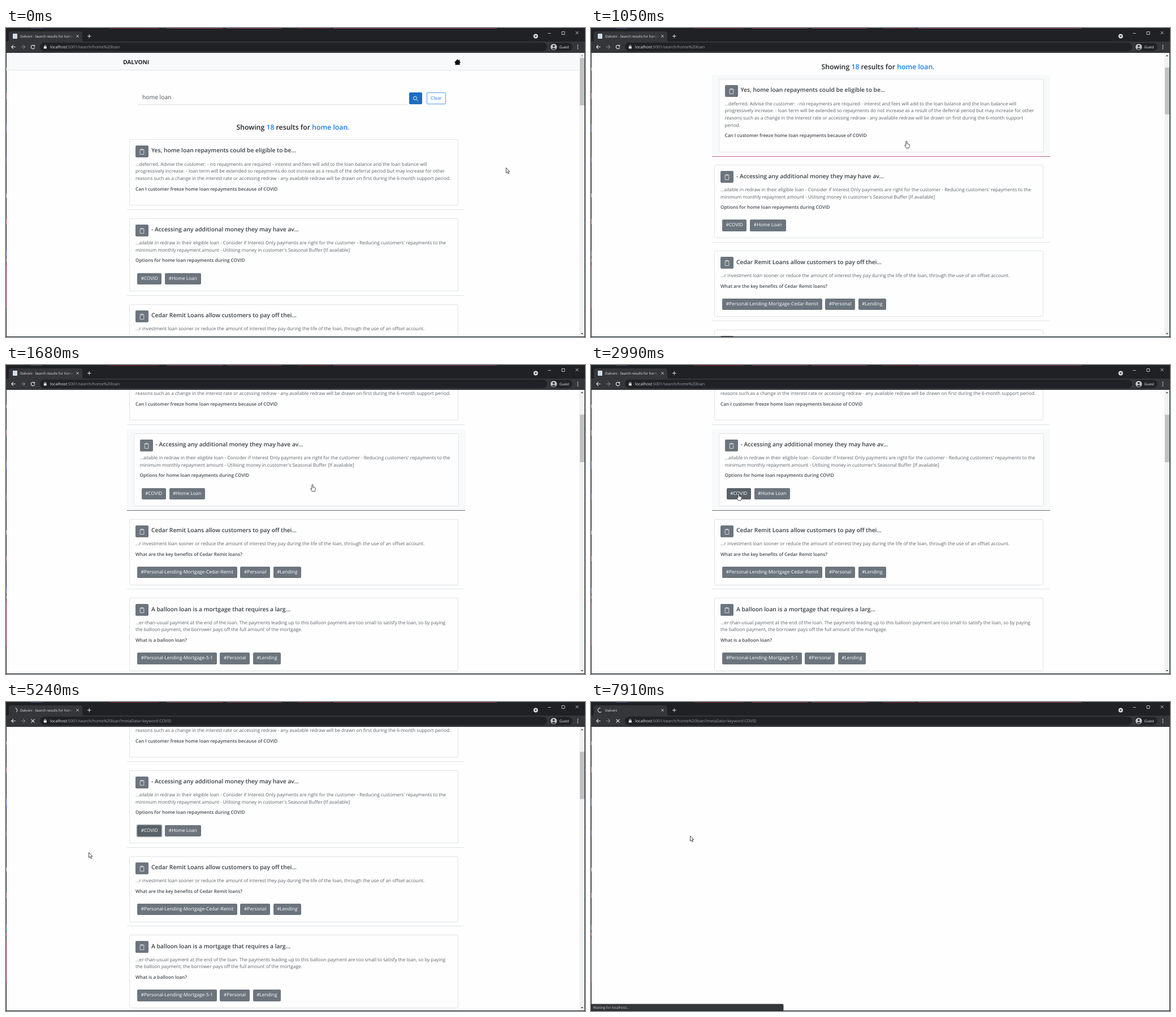
An HTML page for the animation above (7.99 s loop, 1024 by 547 pixels).

```html
<!DOCTYPE html>
<html lang="en">
<head>
<meta charset="utf-8">
<title>Search results</title>
<style>
* { box-sizing: border-box; }
html, body { margin: 0; width: 100%; height: 100%; overflow: hidden; background: #202124; }
body { font-family: "Open Sans", "Noto Sans", sans-serif; text-rendering: geometricPrecision; }
#stage { position: absolute; left: 0; top: 0; width: 1024px; height: 547px; overflow: hidden; }
#stage svg { position: absolute; display: block; }
#frame, #cursor, #status { left: 0; top: 0; }
#page { position: absolute; left: 1px; top: 44px; width: 1022px; height: 502px; background: #fefefe; overflow: hidden; }
#doc { position: absolute; left: -1px; top: -44px; width: 1024px; height: 900px; white-space: nowrap; }
#doc > * { position: absolute; }
.nav { left: 1px; top: 44px; width: 1014px; height: 31px; background: #f8f9fa; border-bottom: 1px solid #e0e3e7; }
.brand { left: 207px; top: 52px; font: 700 10.2px/16px "Open Sans", sans-serif; color: #212529; }
.query { left: 241px; top: 115px; font-size: 10.3px; line-height: 16px; color: #495057; }
.rule { left: 233px; top: 135px; width: 477px; height: 1px; background: #d8dce0; }
.go { left: 713px; top: 114px; width: 23px; height: 21px; border-radius: 2px; background: #1b6ec2; }
.clear { left: 744px; top: 114px; width: 34px; height: 21px; border: 1px solid #4a9df5; border-radius: 2px;
  font-size: 8.3px; line-height: 19px; text-align: center; color: #1a82f7; }
.count { left: 214px; width: 587px; top: 167px; text-align: center; font-weight: 600; font-size: 12.25px; line-height: 18px; color: #212529; }
.count i { font-style: normal; color: #127ff5; }
ul { left: 214px; top: 190.2px; width: 598px; margin: 0; padding: 0; list-style: none; font-size: 8.25px; line-height: 12.8px; color: #5c6268; }
li { width: 597px; padding: 6.8px 0 6.6px; margin-bottom: 8px; border-bottom: 1px solid #dfe2e5; }
li.on { width: 598px; background: #f8f9fa; }
.card { position: relative; margin-left: 4px; width: 582px; padding: 37.6px 0 20.7px 10px;
  border: 1px solid #e1e3e5; border-radius: 2.2px; background: #fefefe; }
.on .card { margin-left: 11.5px; width: 575px; }
.card h5 { position: absolute; left: 38px; top: 12.5px; margin: 0; font-size: 10.27px; line-height: 15px; font-weight: 600; color: #393f44; }
.clip { position: absolute; left: 10px; top: 10px; width: 23px; height: 21px; border-radius: 2px; background: #6c757d; }
.card b { display: block; margin-top: 5.7px; font-weight: 600; font-size: 8.2px; color: #454b51; }
br.wrap { display: none; }
.on br.wrap { display: inline; }
.tags { display: flex; gap: 5.6px; margin: 14.3px 0 -9.4px 3px; }
.tags span { height: 20.5px; padding: 0 6.7px; border-radius: 2px; background: #6c757d; color: #fff; font-size: 8.3px; line-height: 20.5px; }
.tags .dark { background: #596168; }
.tags .ring { box-shadow: 0 0 0 1.6px #b4b9bd; }
#bar { position: absolute; left: 1013px; top: 0; width: 9px; height: 502px; background: #f1f1f1; }
#thumb { position: absolute; left: 1px; width: 8px; background: #c1c1c1; }
#bar svg { left: 0; top: 0; }
</style>
</head>
<body>
<div id="stage">
  <div id="page">
    <div id="doc">
      <div class="nav"></div>
      <div class="brand">DALVONI</div>
      <svg style="left:793px;top:55px" width="11" height="11"><path d="M5.5 .3 8 2.8V1.2h1.4v3L11 5.8l-.7.6-.7-.6V10.3H1.5V5.8l-.8.6L0 5.8Z" fill="#0c0d0e"/></svg>
      <div class="query">home loan</div>
      <div class="rule"></div>
      <div class="go"><svg width="23" height="21" fill="none" stroke="#fff" stroke-width=".9"><circle cx="10.5" cy="10.2" r="3"/><path d="m12.8 12.4 3 3"/></svg></div>
      <div class="clear">Clear</div>
      <div class="count">Showing <i>18</i> results for <i>home loan.</i></div>
      <ul id="list"></ul>
    </div>
    <div id="bar">
      <div id="thumb"></div>
      <svg width="9" height="502"><path id="up" d="M2.5 6 4.8 3.4 7.1 6Z"/><path d="M2.5 496 4.8 498.6 7.1 496Z" fill="#505050"/></svg>
    </div>
  </div>

  <svg id="frame" width="1024" height="547">
    <defs>
      <linearGradient id="fade" gradientUnits="userSpaceOnUse" x1="108" x2="119"><stop stop-color="#35363a" stop-opacity="0"/><stop offset="1" stop-color="#35363a"/></linearGradient>
      <clipPath id="tabClip"><path d="M20 6h99v18H20Z"/></clipPath>
    </defs>
    <path d="M0 0H1024V24H0Z" fill="#202124"/>
    <path d="M0 24H1024V44H0Z" fill="#35363a"/>
    <path d="M0 43.5H1024" stroke="#2b2c2f"/>
    <g id="edges"></g>
    <path d="M2 24q3 0 3-3V10q0-4 4-4H131q4 0 4 4V21q0 3 3 3Z" fill="#35363a"/>
    <rect id="icon" x="12" y="10" width="8" height="9" rx="1" fill="#cddfe8"/>
    <g id="spin" fill="none" stroke-width="1.1"><path id="arc" stroke="#d5d8dc"/></g>
    <g clip-path="url(#tabClip)"><text id="tab" x="25" y="17" font-size="6.1" fill="#e8eaed"></text></g>
    <path d="M108 8h11v14h-11Z" fill="url(#fade)"/>
    <g stroke="#e2e4e7" stroke-width="1" fill="none">
      <path d="m124.5 12.5 4 4m0-4-4 4M144 14.5h6.5M147.2 11.2v6.6"/>
      <path d="M958.5 9.5h5M983 6.5h5v5h-5ZM1007.5 6l5 5m0-5-5 5" stroke-width=".8"/>
      <path d="M16.8 33.5H9.8M13 30.2 9.7 33.5 13 36.8" stroke-width="1.1"/>
      <path d="M26.5 33.5h7M30.3 30.2l3.3 3.3-3.3 3.3" stroke="#7d8084" stroke-width="1.1"/>
      <g id="reload"><path d="M50 31.3A3.3 3.3 0 1 0 50.8 34.4" stroke-width="1.2"/><path d="M51.2 29.6v3.2H48Z" fill="#e2e4e7" stroke="none"/></g>
      <path id="stop" d="m44.6 30.6 5.8 5.8m0-5.8-5.8 5.8" stroke-width="1.2"/>
    </g>
    <circle cx="936.8" cy="14.6" r="4" fill="#d6d8db"/><path d="M934.8 13.6h4l-2 2.6Z" fill="#202124"/>
    <rect x="60" y="26" width="897" height="15" rx="7.5" fill="#202124"/>
    <rect x="66.8" y="32.6" width="5" height="4" rx=".5" fill="#e2e4e7"/><path d="M67.9 33v-1.3a1.4 1.4 0 0 1 2.8 0V33" fill="none" stroke="#e2e4e7" stroke-width=".8"/>
    <text x="78" y="36.2" font-size="7.15" fill="#e8eaed">localhost<tspan id="url" fill="#9aa0a6"></tspan></text>
    <rect x="961.5" y="26.5" width="40" height="14" rx="7" fill="#202124"/>
    <circle cx="968.7" cy="33.6" r="5.7" fill="#bfc3c8"/><circle cx="968.7" cy="32" r="1.9" fill="#35363a"/><path d="M965 37q3.7-3.6 7.4 0-3.7 3-7.4 0Z" fill="#35363a"/>
    <text x="978.6" y="36" font-size="6.4" fill="#f1f3f4">Guest</text>
    <g fill="#e2e4e7"><circle cx="1011.3" cy="30.6" r=".9"/><circle cx="1011.3" cy="33.6" r=".9"/><circle cx="1011.3" cy="36.6" r=".9"/></g>
  </svg>

  <svg id="status" width="1024" height="547">
    <path d="M1 534.5H338q2.5 0 2.5 2.5V546H1Z" fill="#35363a"/>
    <text x="3.6" y="542.7" font-size="6.2" fill="#c9ccd0">Waiting for localhost...</text>
  </svg>

  <svg id="cursor" width="1024" height="547">
    <g id="pointer" fill="#fff" stroke="#26282b" stroke-width=".85" stroke-linejoin="round">
      <path id="arrow" d="M.5 .5V9.8L2.6 7.8 4.2 11.2 5.6 10.5 4.1 7.2H6.9Z"/>
      <path id="hand" d="M0 .5q1 0 1 1V5.2l3.3.8q1.3.4 1.2 1.7l-.6 3.2-.8 2H-.5L-2.9 8.9q-.6-1.1.2-1.5.8-.3 1.7.8V1.5q0-1 1-1Z"/>
    </g>
  </svg>
</div>

<script>
const LOOP = 7990;
const $ = id => document.getElementById(id);
const show = (id, on) => { $(id).style.display = on ? "" : "none"; };

const results = [
  { title: "Yes, home loan repayments could be eligible to be...",
    text: ["...deferred. Advise the customer: - no repayments are required - interest and fees will add to the loan balance and the loan balance will",
      "progressively increase. - loan term will be extended so repayments do not increase as a result of the deferral period but may increase for other",
      "reasons such as a change in the interest rate or accessing redraw - any available redraw will be drawn on first during the 6-month support <br class='wrap'>period."],
    topic: "Can I customer freeze home loan repayments because of COVID", tags: [] },
  { title: "- Accessing any additional money they may have av...",
    text: ["...ailable in redraw in their eligible loan - Consider if Interest Only payments are right for the customer - Reducing customers' repayments to the",
      "minimum monthly repayment amount - Utilising money in customer's Seasonal Buffer [If available]"],
    topic: "Options for home loan repayments during COVID", tags: ["COVID", "Home Loan"] },
  { title: "Cedar Remit Loans allow customers to pay off thei...",
    text: ["...r investment loan sooner or reduce the amount of interest they pay during the life of the loan, through the use of an offset account."],
    topic: "What are the key benefits of Cedar Remit loans?",
    tags: ["Personal-Lending-Mortgage-Cedar-Remit", "Personal", "Lending"] },
  { title: "A balloon loan is a mortgage that requires a larg...",
    text: ["...er-than-usual payment at the end of the loan. The payments leading up to this balloon payment are too small to satisfy the loan, so by paying",
      "the balloon payment, the borrower pays off the full amount of the mortgage."],
    topic: "What is a balloon loan?", tags: ["Personal-Lending-Mortgage-5-1", "Personal", "Lending"] }
];

const clipboard = `<svg class="clip" viewBox="0 0 23 21" fill="none" stroke="#eef0f1" stroke-width=".8">
  <path d="M10 7.2H8.2V15.6H14.8V7.2H13M10 6.4h3v1.7h-3Z"/></svg>`;

$("list").innerHTML = results.map(r => `<li><div class="card">${clipboard}<h5>${r.title}</h5>
  <div>${r.text.join("<br>")}</div><b>${r.topic}</b>
  ${r.tags.length ? `<div class="tags">${r.tags.map(t => `<span>#${t}</span>`).join("")}</div>` : ""}</div></li>`).join("");
const items = [...document.querySelectorAll("li")];
const covid = items[1].querySelector(".tags span");

// Slivers of the desktop behind the window: [start, length, colour]
const topSlivers = [[0, 1024, "#17262b"], [44, 20, "#4a4c86"], [182, 88, "#7d2438"], [284, 100, "#8c3f58"],
  [390, 98, "#8c3f58"], [516, 58, "#7d2438"], [578, 290, "#8c3f58"]];
const leftSlivers = [[44, 502, "#1c2126"], [70, 6, "#77797d"], [115, 10, "#a2482c"], [170, 14, "#2455a0"],
  [228, 10, "#2c3f8c"], [293, 7, "#85878a"], [338, 9, "#a2482c"], [394, 10, "#2455a0"], [408, 6, "#a3394f"], [420, 76, "#7c2237"]];
const rect = (x, y, w, h, c) => `<path d="M${x} ${y}h${w}v${h}h${-w}Z" fill="${c}"/>`;
$("edges").innerHTML = topSlivers.map(([s, n, c]) => rect(s, 0, n, 1, c)).join("")
  + leftSlivers.map(([s, n, c]) => rect(0, s, 1, n, c)).join("")
  + rect(1023, 44, 1, 503, "#1c2529") + rect(0, 546, 1024, 1, "#17262b");

// Keys are [time, ...values]
const scrollKeys = [[650, 0], [790, 52], [830, 58], [930, 107], [1080, 107], [1200, 157], [1310, 160], [1510, 160], [1600, 200], [1680, 216]];
const cursorKeys = [[30, 884, 247], [520, 558, 201], [830, 558, 201], [1310, 558, 198], [1500, 558, 198], [1680, 542, 211],
  [2280, 328, 255], [2340, 328, 255], [2990, 261, 227], [4180, 261, 227], [4600, 148, 259], [5240, 146, 266],
  [5400, 155, 271], [5480, 155, 271], [6260, 175, 236.5]];

const linear = u => u;
const smooth = u => u * u * (3 - 2 * u);

function sample(keys, t, ease) {
  if (t <= keys[0][0]) return keys[0].slice(1);
  const i = keys.findIndex(k => k[0] > t);
  if (i < 0) return keys[keys.length - 1].slice(1);
  const a = keys[i - 1], b = keys[i], u = ease((t - a[0]) / (b[0] - a[0]));
  return a.slice(1).map((v, j) => v + (b[j + 1] - v) * u);
}

function arcPath(mid, sweep) {
  const r = 3.8, rad = Math.PI / 180;
  const point = a => `${16 + r * Math.cos(a * rad)} ${14.5 + r * Math.sin(a * rad)}`;
  return `M${point(mid - sweep / 2)}A${r} ${r} 0 ${sweep > 180 ? 1 : 0} 1 ${point(mid + sweep / 2)}`;
}

function draw(t) {
  const scroll = Math.round(sample(scrollKeys, t, linear)[0]);
  const [x, y] = sample(cursorKeys, t, smooth);
  const inList = x < 812 && x > 214;
  const hover = !inList ? -1 : t < 1150 ? 0 : 1;
  const loading = t >= 3930, blank = t >= 6430;

  $("doc").style.transform = `translateY(${-scroll}px)`;
  items.forEach((li, i) => {
    li.classList.toggle("on", i === hover);
    li.style.borderBottomColor = i !== hover ? "" : t < 1510 ? "#cf5f80" : "#68736e";
  });
  covid.classList.toggle("dark", t >= 2800);
  covid.classList.toggle("ring", t >= 3850);
  show("doc", !blank);
  show("bar", !blank);
  $("thumb").style.top = 9 + Math.round(scroll * .163) + "px";
  $("thumb").style.height = (hover === 0 ? 83 : 84) + "px";
  $("up").setAttribute("fill", scroll ? "#505050" : "#a3a3a3");

  $("tab").textContent = blank ? "Dalvoni" : "Dalvoni - Search results for home loan";
  $("url").textContent = ":5001/search/home%20loan" + (loading ? "?metaData=keyword:COVID" : "");
  show("icon", !loading);
  show("spin", loading);
  show("reload", !loading);
  show("stop", loading);
  show("status", (t >= 4000 && t < 4560) || t >= 5600);
  if (loading) $("arc").setAttribute("d", arcPath(-15 - (t - 5240) / 1068 * 360, blank ? 230 : 135));

  $("pointer").setAttribute("transform", `translate(${x} ${y})`);
  show("hand", inList);
  show("arrow", !inList);
}

function tick() {
  draw(performance.now() % LOOP);
  requestAnimationFrame(tick);
}
tick();
</script>
</body>
</html>
```
